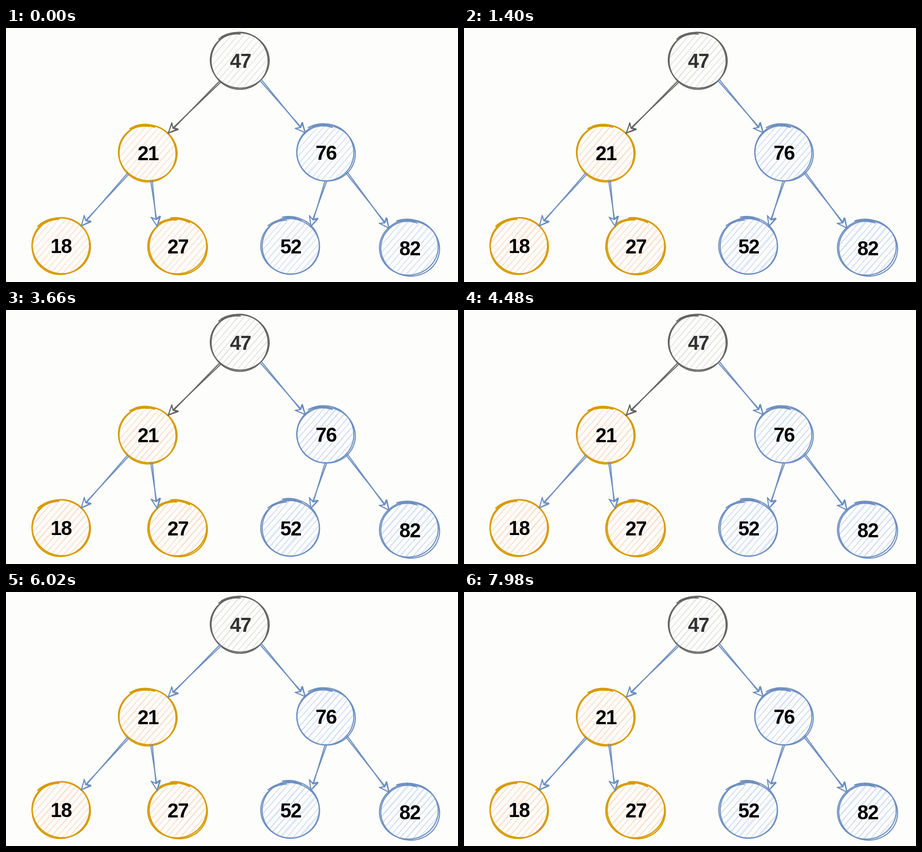
Recreate the animation shown at these times as an HTML page with a canvas. Size 998 px wide and 561 px high, loop 8 s.

```html
<!DOCTYPE html>
<html lang="en">
<head>
<meta charset="utf-8">
<title>Binary search tree</title>
<style>
  html, body { margin: 0; width: 100%; height: 100%; overflow: hidden; background: #fdfdfb; }
  canvas { display: block; width: 998px; height: 561px; }
</style>
</head>
<body>
<canvas id="stage" width="998" height="561"></canvas>
<script>
const ctx = document.getElementById('stage').getContext('2d');
const LOOP = 8000;
const ARROW_TURNS_BLUE = 5860;
const PAPER = '#fdfdfb';
const RX = 64, RY = 62;
const RAD = Math.PI / 180;

const GREY = { line: '#636363', hatch: '#e3e3e5', text: '#333333', width: 2.4 };
const ORANGE = { line: '#d79b00', hatch: '#fcdfcc', text: '#000000', width: 2.8 };
const BLUE = { line: '#6c8ebf', hatch: '#d0def7', text: '#000000', width: 2.4 };

const node = (label, theme, x, y, left, right) => ({ label, theme, x, y, left, right });
const n18 = node('18', ORANGE, 121, 481);
const n27 = node('27', ORANGE, 379, 482);
const n52 = node('52', BLUE, 628, 482);
const n82 = node('82', BLUE, 891, 486);
const n21 = node('21', ORANGE, 313, 276, n18, n27);
const n76 = node('76', BLUE, 706, 275, n52, n82);
const root = node('47', GREY, 517, 72, n21, n76);

function randomFrom(seed) {
  return () => {
    seed = (seed * 16807) % 2147483647;
    return seed / 2147483647;
  };
}

function path(points) {
  ctx.beginPath();
  points.forEach(([x, y]) => ctx.lineTo(x, y));
}

function stroke(points) {
  path(points);
  ctx.stroke();
}

// Point on the rim of a node, angle in degrees clockwise from the right.
function rim({ x, y }, degrees) {
  return [x + RX * Math.cos(degrees * RAD), y + RY * Math.sin(degrees * RAD)];
}

// One pen stroke around the node whose loose ends overlap near the top.
function ring({ x, y }, random) {
  const start = (-125 + 45 * random()) * RAD;
  const overlap = 0.35, turn = 2 * Math.PI;
  const dx = 3 * (random() - 0.5), dy = 3 * (random() - 0.5);
  const phase = turn * random();
  const points = [];
  for (let a = -overlap; a <= turn + overlap; a += 0.06) {
    const head = Math.max(0, 1 - (a + overlap) / 0.6);
    const tail = Math.max(0, 1 - (turn + overlap - a) / 0.6);
    const r = 1 + 0.016 * Math.sin(2 * a + phase) + 0.05 * (head - tail);
    points.push([x + dx + RX * r * Math.cos(start + a), y + dy + RY * r * Math.sin(start + a)]);
  }
  stroke(points);
}

function hatch({ x, y, theme }, random, strength) {
  ctx.save();
  ctx.beginPath();
  ctx.ellipse(x, y, RX, RY, 0, 0, 2 * Math.PI);
  ctx.clip();
  ctx.translate(x, y);
  ctx.rotate(-49 * RAD);
  ctx.globalAlpha = strength;
  ctx.strokeStyle = theme.hatch;
  ctx.lineWidth = 1.6;
  for (let row = -63; row < 66; row += 10.5) {
    for (let pass = 0; pass < 2; pass++) {
      stroke([[-70, row + 3 * random()], [70, row + 3 * random()]]);
    }
  }
  ctx.restore();
}

function drawNode(n, strength) {
  const random = randomFrom(n.x * 97 + n.y);
  hatch(n, random, strength);
  ctx.strokeStyle = n.theme.line;
  ctx.lineWidth = n.theme.width;
  ring(n, random);
  ring(n, random);
  ctx.fillStyle = n.theme.text;
  ctx.fillText(n.label, n.x + 0.5, n.y + 16);
}

function drawArrow([x, y], [tipX, tipY], color) {
  const length = Math.hypot(tipX - x, tipY - y);
  ctx.save();
  ctx.translate(tipX, tipY);
  ctx.rotate(Math.atan2(tipY - y, tipX - x));
  ctx.strokeStyle = color;
  ctx.fillStyle = PAPER;
  ctx.lineWidth = 2.3;
  stroke([[-length, -2.4], [-15, 0.8]]);
  stroke([[-length, 1.4], [-15, -0.8]]);
  path([[0, 0], [-21, -10], [-15, 0], [-21, 10], [0, 0]]);
  ctx.fill();
  ctx.stroke();
  ctx.lineWidth = 1.8;
  stroke([[1, 1], [-22, -8.5], [-16, 1], [-22, 11], [1, -1]]);
  ctx.restore();
}

// Children are reached at their upper corner facing the parent.
function drawTree(n, strength, t) {
  drawNode(n, strength);
  if (!n.left) return;
  drawTree(n.left, strength, t);
  drawTree(n.right, strength, t);
  const leftStart = n === n76 ? 90 : 133;
  const rightStart = n === n21 ? 83 : 45;
  const visited = n === root && t < ARROW_TURNS_BLUE;
  drawArrow(rim(n, leftStart), rim(n.left, -45), (visited ? GREY : BLUE).line);
  drawArrow(rim(n, rightStart), rim(n.right, -135), BLUE.line);
}

function draw(now) {
  const t = now % LOOP;
  const strength = 0.75 + 0.25 * Math.min(t / 400, 1);
  ctx.fillStyle = PAPER;
  ctx.fillRect(0, 0, 998, 561);
  drawTree(root, strength, t);
}

ctx.font = 'bold 44px "Liberation Sans", Arial, sans-serif';
ctx.letterSpacing = '-1.5px';
ctx.textAlign = 'center';
ctx.lineCap = ctx.lineJoin = 'round';

const began = performance.now();
function frame() {
  draw(performance.now() - began);
  requestAnimationFrame(frame);
}
frame();
</script>
</body>
</html>
```
